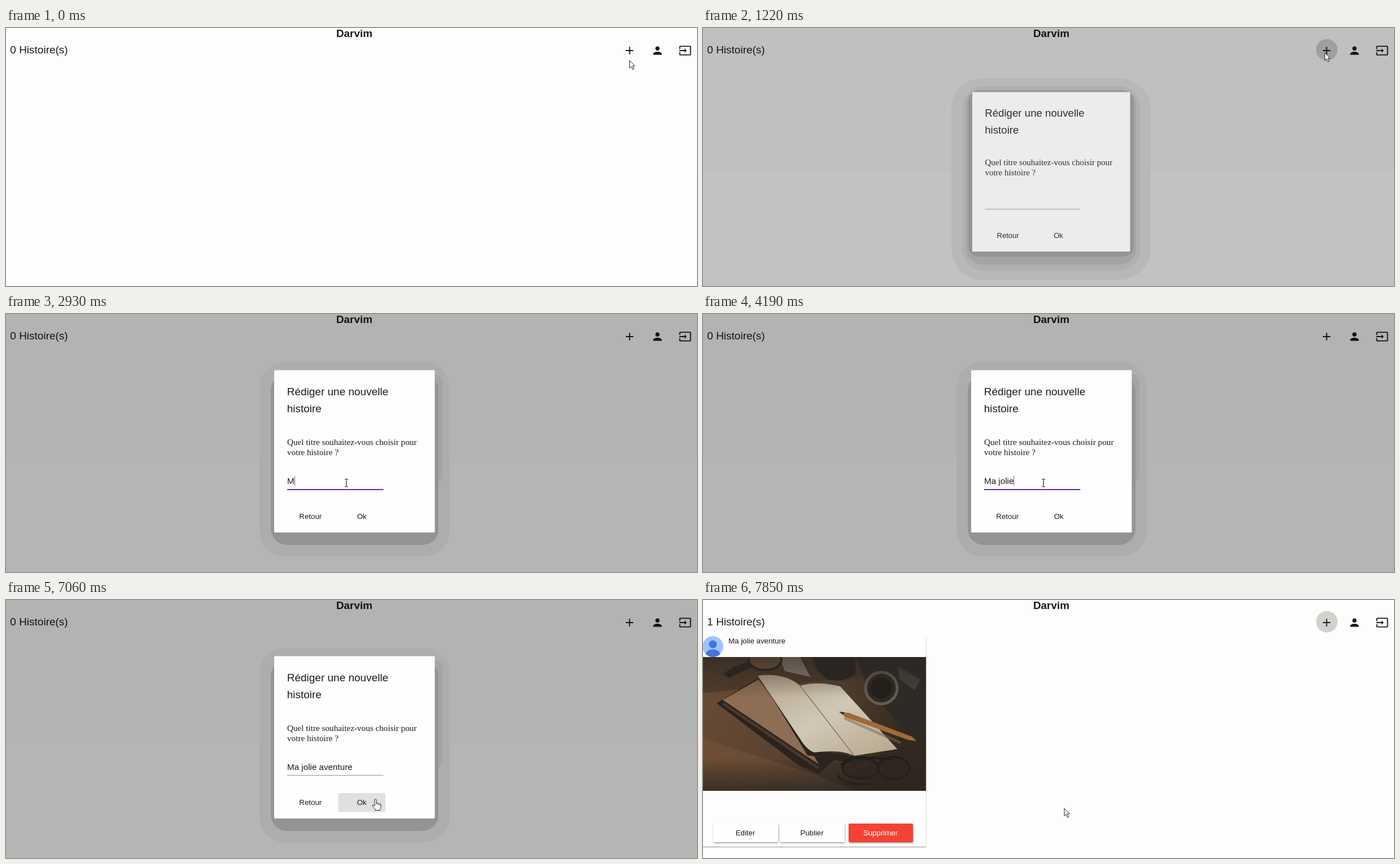
Write an HTML page that moves like this. It is 1224 px wide and 457 px high and loops after 8 s.

```html
<!DOCTYPE html>
<html lang="fr">
<head>
<meta charset="utf-8">
<title>Darvim</title>
<style>
  html, body { margin: 0; width: 100%; height: 100%; overflow: hidden; background: #fdfdfd; }
  svg { display: block; width: 100vw; height: 100vh; }
  text { font-family: "Liberation Sans", Arial, sans-serif; fill: #1b1b1b; white-space: pre; }
  .large { font-size: 19px; }
  .field { font-size: 15.2px; }
  .small { font-size: 13.3px; }
  .serif { font-family: "Liberation Serif", "Times New Roman", serif; font-size: 15.2px; }
  .mid { text-anchor: middle; }
  .pointer { fill: #fff; stroke: #222; stroke-width: 1; stroke-linejoin: round; }
</style>
</head>
<body>
<svg viewBox="0 0 1224 457" preserveAspectRatio="none">
  <defs>
    <clipPath id="photoClip"><path d="M0 101H395V338H0Z"/></clipPath>
    <clipPath id="avatarClip"><circle cx="17.5" cy="82.5" r="18.5"/></clipPath>
    <clipPath id="okClip"><rect x="588.5" y="342" width="83.5" height="33.5" rx="2"/></clipPath>
    <linearGradient id="wood" x2="1" y2=".35">
      <stop stop-color="#6b4c35"/><stop offset=".55" stop-color="#594231"/><stop offset="1" stop-color="#30291f"/>
    </linearGradient>
    <linearGradient id="paper" x2="1" y2="1">
      <stop stop-color="#b5a48b"/><stop offset=".5" stop-color="#d0c8b7"/><stop offset="1" stop-color="#b7a68c"/>
    </linearGradient>
    <linearGradient id="vignette" x2="0" y2="1">
      <stop stop-color="#2b2520" stop-opacity=".55"/><stop offset=".3" stop-color="#2b2520" stop-opacity="0"/>
      <stop offset=".75" stop-color="#2b2520" stop-opacity="0"/><stop offset="1" stop-color="#2b2520" stop-opacity=".75"/>
    </linearGradient>
    <filter id="lift" x="-10%" y="-20%" width="120%" height="150%">
      <feDropShadow dx=".5" dy="1.5" stdDeviation="1" flood-opacity=".4"/>
    </filter>
  </defs>

  <rect width="1224" height="457" fill="#fdfdfd"/>
  <circle id="focusRing" cx="1105" cy="38.5" r="19" fill="#d4d1cc"/>
  <text class="mid" x="617" y="16.3" font-size="18.9" font-weight="bold">Darvim</text>
  <text id="counter" class="large" x="7.3" y="45"></text>
  <g fill="#1b1b1b">
    <path d="M1098 39H1103.7V33.3H1105.6V39H1111.3V41H1105.6V46.7H1103.7V41H1098Z"/>
    <path transform="translate(1142.6 28.6) scale(.95)" d="M12 12c2.21 0 4-1.79 4-4s-1.79-4-4-4-4 1.79-4 4 1.79 4 4 4zm0 2c-2.67 0-8 1.34-8 4v2h16v-2c0-2.66-5.33-4-8-4z"/>
    <path transform="translate(1191.6 28.6) scale(.95)" d="M21 3H3c-1.1 0-2 .9-2 2v4h2V5h18v14H3v-4H1v4c0 1.1.9 2 2 2h18c1.1 0 2-.9 2-2V5c0-1.1-.9-2-2-2zM11 16l4-4-4-4v3H1v2h10v3z"/>
  </g>

  <g id="card">
    <path d="M395.5 66V437" stroke="#e2e2e2"/>
    <path d="M0 437.5H395" stroke="#b0b0b0" stroke-width="1.5"/>
    <g clip-path="url(#avatarClip)">
      <rect y="64" width="37" height="38" fill="#a0c3ff"/>
      <g fill="#4374e0"><circle cx="17.5" cy="78.5" r="7"/><ellipse cx="17.5" cy="96" rx="12.5" ry="8.5"/></g>
    </g>
    <text class="small" x="45" y="77">Ma jolie aventure</text>
    <g clip-path="url(#photoClip)">
      <rect y="101" width="395" height="237" fill="url(#wood)"/>
      <path d="M0 101H395V124L0 165Z" fill="#3d2f25" opacity=".5"/>
      <path d="M0 245L200 310 270 338H0Z" fill="#795439" opacity=".5"/>
      <path d="M135 101H172L190 136 145 126Z" fill="#8c8274"/>
      <path d="M36 131Q52 116 90 108L96 115 45 138Z" fill="#292521"/>
      <ellipse cx="110" cy="106" rx="29" ry="18" fill="#71573f" stroke="#292521" stroke-width="4"/>
      <path d="M194 101H270V130Q248 149 220 140 196 122 194 101Z" fill="#282522"/>
      <path d="M270 101H395V235L350 225 290 150Z" fill="#2e2a26"/>
      <path d="M345 118L385 140 375 160 348 140Z" fill="#45403b"/>
      <circle cx="316" cy="156" r="28" fill="#2e2924" stroke="#655c52" stroke-width="5"/>
      <circle cx="316" cy="156" r="19" fill="#211e1b"/>
      <path d="M24 183L95 140 200 268 245 272 205 308 170 293Z" fill="#2b231d"/>
      <path d="M35 177L98 141 190 265 205 291Z" fill="#8d6d53"/>
      <path d="M35 183L205 298" stroke="#4b382b" stroke-width="5"/>
      <path d="M98 133L170 240 195 271 250 272 270 282 343 270 270 290 185 275Z" fill="#2b251f"/>
      <path d="M97 134Q145 128 172 152 200 143 243 153L344 264 268 276Q245 264 197 270 184 266 172 246Z" fill="url(#paper)"/>
      <path d="M172 152L268 276" stroke="#86755f" stroke-width="1.5"/>
      <path d="M250 209L350 253" stroke="#786850" stroke-width="5" opacity=".5"/>
      <path d="M241 198L259 200 370 242 378 250 364 248 253 208Z" fill="#a06a35"/>
      <path d="M241 198L251 199 248 203Z" fill="#29231e"/>
      <g fill="#30271f" fill-opacity=".7" stroke="#211e1b" stroke-width="4">
        <ellipse cx="279" cy="298" rx="32" ry="18"/><ellipse cx="338" cy="298" rx="28" ry="20"/>
        <path d="M244 292L262 278 335 282M300 325Q250 330 238 310" fill="none"/>
      </g>
      <rect y="101" width="395" height="237" fill="url(#vignette)"/>
    </g>
    <g filter="url(#lift)">
      <rect x="18" y="396" width="115" height="33" rx="2" fill="#fefefe"/>
      <rect x="136" y="396" width="115" height="33" rx="2" fill="#fefefe"/>
      <rect x="258" y="396" width="114" height="33" rx="2" fill="#f44336"/>
    </g>
    <g class="small mid">
      <text x="75" y="417">Editer</text>
      <text x="193" y="417">Publier</text>
      <text x="314.5" y="417" style="fill:#fff">Supprimer</text>
    </g>
  </g>

  <g id="backdrop">
    <rect width="1224" height="457"/>
    <rect width="1224" height="56" opacity=".16"/>
  </g>
  <g id="shadow"></g>

  <g id="dialog">
    <rect x="475" y="99.5" width="284.5" height="287.5" rx="1.5" fill="#fefefe"/>
    <g class="large"><text x="497.7" y="144">Rédiger une nouvelle</text><text x="497.7" y="174.3">histoire</text></g>
    <text class="serif" x="498" y="231.5">Quel titre souhaitez-vous choisir pour</text>
    <text class="serif" x="498" y="249.7">votre histoire ?</text>
    <text id="entry" class="field" x="498" y="301"></text>
    <rect id="caret" y="287" width="1" height="17" fill="#7a45c4"/>
    <rect id="underline" x="498" width="170.5"/>
    <g clip-path="url(#okClip)">
      <rect id="okHover" x="588" y="341" width="85" height="35"/>
      <circle id="okRipple" cx="662" cy="352" r="49" fill="#c8c8c8"/>
    </g>
    <text class="small mid" x="539.3" y="362.6">Retour</text>
    <text class="small mid" x="630.2" y="362.6">Ok</text>
  </g>

  <g id="pointer">
    <path id="arrow" class="pointer" d="M.5 .5V14L3.7 11 6 16.5 8.3 15.5 6 10.2H10Z"/>
    <path id="hand" class="pointer" d="M-1 1.7Q-1 .3 .5 .3T2 1.7V7Q4 6 5 8 7 7 8 9 10 8 10 10.5V14Q10 17 8.5 18V20H0V18L-5 12.5Q-5.5 10-3 10.5L-1 12.5ZM2 7V10M5 8V11M8 9V11"/>
    <path id="beam" d="M-3 -6.5H-1L0 -6 1 -6.5H3M0 -6V6.5M-3 7H-1L0 6.5 1 7H3" fill="none" stroke="#222" stroke-width="1.2"/>
  </g>
</svg>

<script>
const LOOP = 8000;
const TITLE = "Ma jolie aventure";
const el = id => document.getElementById(id);
const show = (id, on) => { el(id).style.display = on ? "" : "none"; };
const within = (t, from, to) => t >= from && t < to;

// Latest entry whose time has been reached.
const held = (keys, t) => keys.reduce((found, key) => key[0] <= t ? key : found);

const pointerKeys = [
  [0, "arrow", 1104, 57], [120, "arrow", 1102, 70], [260, "arrow", 1094, 95],
  [400, "arrow", 1080, 121], [530, "arrow", 1084, 108], [670, "arrow", 1092, 80],
  [800, "arrow", 1099, 50], [940, "arrow", 1104, 23], [1070, "arrow", 1101, 43.5],
  [1340, "arrow", 960, 130], [1480, "arrow", 800, 250], [1620, "arrow", 700, 330],
  [1790, "hand", 650, 352], [2060, "beam", 603, 299], [6370, "beam", 607, 305],
  [6510, "arrow", 620, 325], [6640, "hand", 640, 346], [6780, "hand", 650, 351],
  [6920, "hand", 654, 352.5], [7300, "arrow", 654, 353], [7420, "arrow", 648, 361],
  [7560, "arrow", 639.5, 368.5]
];

const typedKeys = [
  [0, 0], [2930, 1], [3210, 2],
  ...Array.from({ length: 8 }, (_, i) => [3480 + Math.round(i * 141.4), 3 + i]),
  [5200, 11], [5350, 12], [5660, 13], [5800, 14], [5950, 16], [6090, 17]
];

// Shadow bands: left, top, right, bottom, radius, colour.
const shadowKeys = [
  [0, []],
  [1220, [[440, 89, 793, 446, 55, "#b8b8b8"], [459, 103, 775, 430, 38, "#b0b0b0"],
          [466, 109, 767, 419, 28, "#a4a4a4"], [470, 111, 763, 405, 18, "#959595"]]],
  [1340, [[449, 85, 786, 429, 45, "#adadad"], [740, 106, 773, 300, 16, "#a5a5a5"],
          [469, 107, 766, 409, 28, "#949494"]]],
  [7180, [[456, 95, 778, 422, 42, "#e7e7e7"], [468, 100, 766, 408, 26, "#d8d8d8"],
          [471, 102, 763, 399, 18, "#c4c4c4"]]],
  [7300, []]
];

const band = ([left, top, right, bottom, radius, colour]) =>
  `<rect x="${left}" y="${top}" width="${right - left}" height="${bottom - top}" rx="${radius}" fill="${colour}"/>`;

let shownShadow;

function draw(t) {
  show("focusRing", within(t, 1220, 1480) || t >= 7420);
  show("card", t >= 7560);
  el("counter").textContent = (t >= 7560 ? 1 : 0) + " Histoire(s)";

  const dimmed = held([[0, 0], [1220, .237], [1340, .265], [1480, .285], [7180, 0]], t)[1];
  el("backdrop").setAttribute("opacity", dimmed);

  const bands = held(shadowKeys, t)[1];
  if (bands !== shownShadow) {
    el("shadow").innerHTML = bands.map(band).join("");
    shownShadow = bands;
  }

  show("dialog", within(t, 1220, 7300));
  const entering = held([[0, 1], [1340, .3], [1480, 0]], t)[1];
  const scale = 1 - .017 * entering;
  el("dialog").setAttribute("transform", `translate(${10 * entering} ${15.7 * entering}) scale(${scale})`);
  el("dialog").setAttribute("opacity", 1 - .17 * entering);

  const focused = within(t, 2190, 6920);
  const entry = el("entry");
  entry.textContent = TITLE.slice(0, held(typedKeys, t)[1]);
  const caretOff = within(t, 2470, 2930) || within(t, 4620, 5060);
  show("caret", focused && !caretOff);
  if (focused) el("caret").setAttribute("x", Math.round(498 + entry.getComputedTextLength()));

  const underline = el("underline");
  underline.setAttribute("y", 310);
  underline.setAttribute("height", focused ? 2 : 1);
  underline.setAttribute("fill", focused ? "#6229b5" : "#929292");

  show("okHover", within(t, 1790, 2060) || within(t, 6640, 7300));
  el("okHover").setAttribute("fill", t >= 7180 ? "#e7e7e7" : "#e0e0e0");
  show("okRipple", t >= 7180);

  const [, kind, x, y] = held(pointerKeys, t);
  for (const name of ["arrow", "hand", "beam"]) show(name, name === kind);
  el("pointer").setAttribute("transform", `translate(${x} ${y})`);
}

const start = performance.now();
function tick() {
  draw((performance.now() - start) % LOOP);
  requestAnimationFrame(tick);
}
tick();
</script>
</body>
</html>
```
